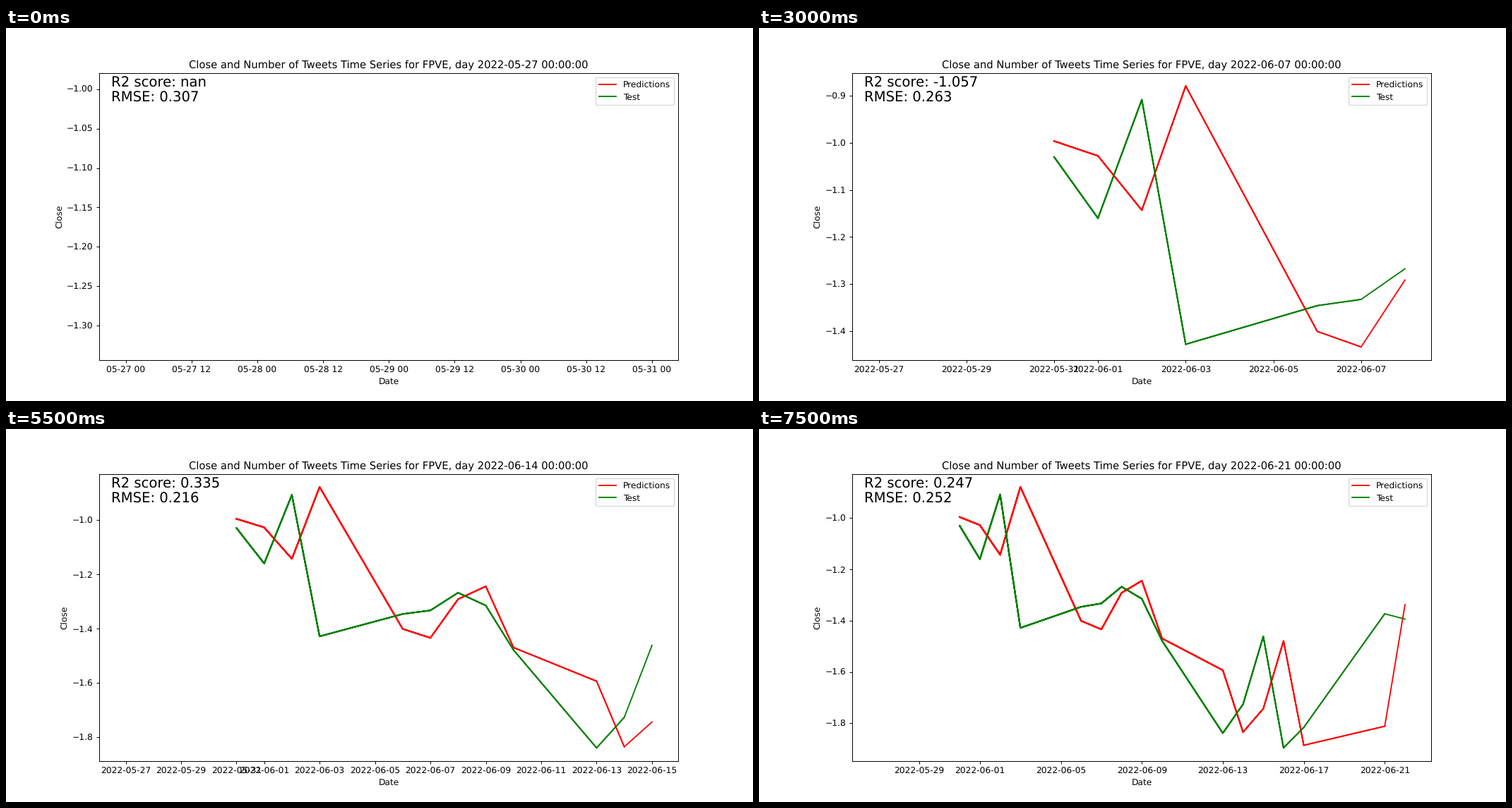
Recreate the animation shown at these times as a matplotlib script. Size 1058 by 529 pixels, loop 8 s.

```python
import numpy as np
import matplotlib.pyplot as plt
from matplotlib.animation import FuncAnimation

STEP_MS = 500
plt.rcParams["text.hinting"] = "none"


def standardise(price):
    return 0.007285 * np.array(price) - 6.5537


# Trading days: weekdays without the two holidays
DAYS = np.arange("2022-05-27", "2022-06-23", dtype="datetime64[D]")
DAYS = DAYS[np.is_busday(DAYS, holidays=["2022-05-30", "2022-06-20"])]

# Daily prices, the key points of both curves
TEST = standardise([759.63, 758.26, 740.37, 775.00, 703.55, 714.84,
                    716.66, 725.60, 719.12, 696.69, 647.21, 662.67,
                    699.00, 639.30, 650.28, 711.11, 708.26])
PRED = standardise([717.47, 762.90, 758.58, 742.72, 778.99, 707.32,
                    702.78, 722.33, 728.82, 697.91, 680.92, 647.76,
                    660.32, 696.58, 640.71, 650.91, 715.95])

SERIES = [(PRED, "red", "Predictions"), (TEST, "green", "Test")]

fig, ax = plt.subplots(figsize=(12, 6), dpi=88.1667)
fig.subplots_adjust(top=0.8795)


def scores(n):
    """R2 and RMSE over the first n days."""
    test = TEST[:n]
    error = np.sum((PRED[:n] - test) ** 2)
    spread = np.sum((test - test.mean()) ** 2)
    r2 = 1 - error / spread if n > 1 else np.nan
    return r2, np.sqrt(error / n)


def draw(k):
    ax.clear()
    # The first day is a lone point: no line, but it widens the limits
    keys = [ax.plot(DAYS[:1], y[:1], color=c, label=name)[0]
            for y, c, name in SERIES]
    # Every step plots the history again, so older parts look heavier
    for end in range(2, k + 3):
        for y, c, _ in SERIES:
            ax.plot(DAYS[1:end], y[1:end], color=c)

    ax.set_title("Close and Number of Tweets Time Series for FPVE, "
                 f"day {DAYS[k]} 00:00:00")
    ax.set_xlabel("Date")
    ax.set_ylabel("Close")
    r2, rmse = scores(k + 1)
    for y, line in [(0.95, f"R2 score: {r2:.3f}"), (0.90, f"RMSE: {rmse:.3f}")]:
        ax.text(0.02, y, line, fontsize=16, transform=ax.transAxes)
    ax.legend(handles=keys, loc="upper right")
    return []


anim = FuncAnimation(fig, draw, frames=len(DAYS) - 1,
                     init_func=lambda: draw(0), interval=STEP_MS,
                     repeat=True, repeat_delay=0, blit=False)
plt.show()
```
